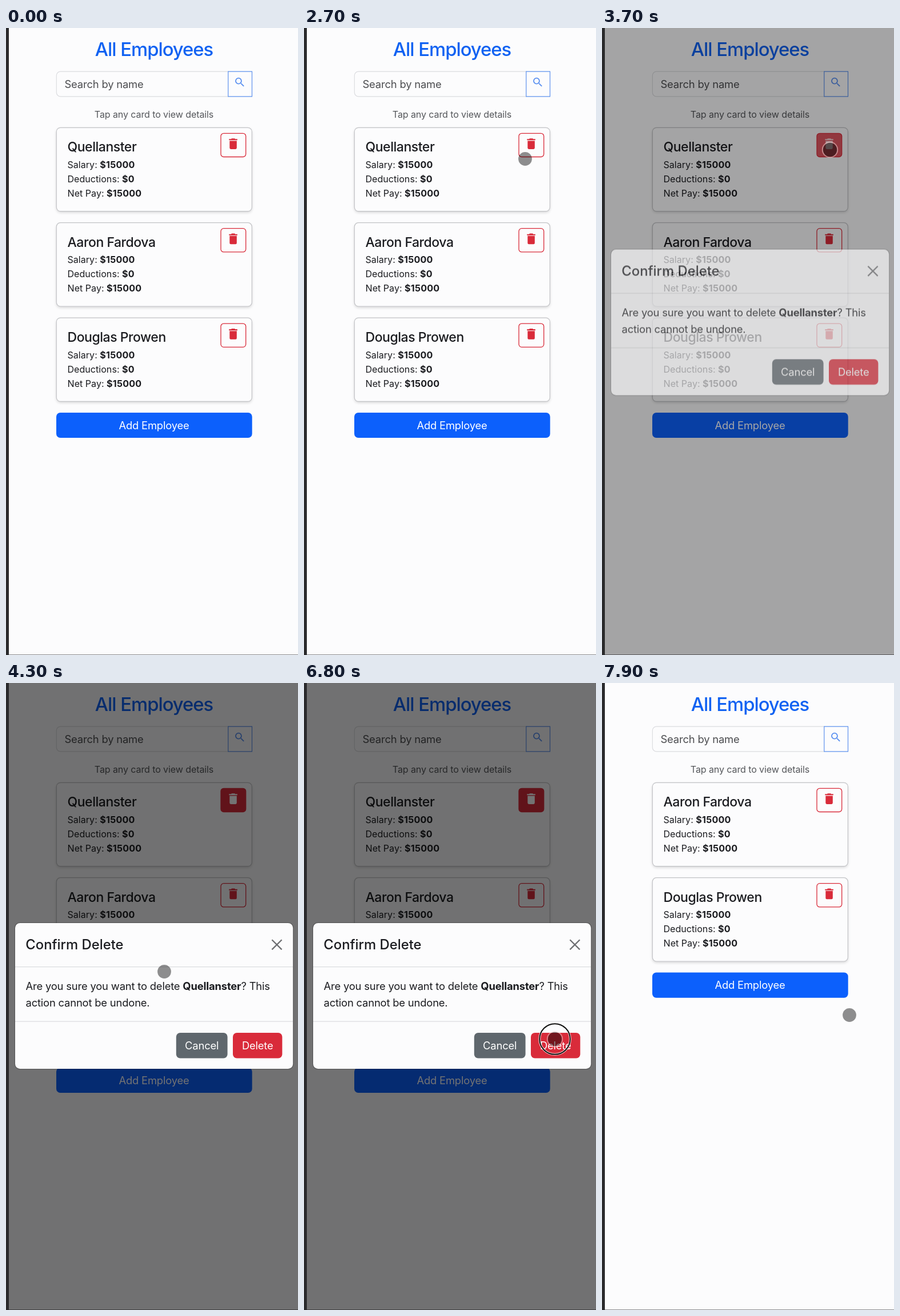
These frames come from a looping animation (511 px wide and 1097 px high, 8 s). An HTML page with a canvas:

```html
<!DOCTYPE html>
<html lang="en">
<head>
<meta charset="utf-8">
<title>All Employees</title>
<style>
  html, body { margin: 0; width: 100%; height: 100%; overflow: hidden; background: #fcfcfd; }
  canvas { display: block; width: 511px; height: 1097px; }
</style>
</head>
<body>
<canvas id="stage"></canvas>
<script>
const W = 511, H = 1097, LOOP = 8000, STEP = 100;
const dpr = window.devicePixelRatio || 1;

function surface(canvas) {
  canvas.width = W * dpr;
  canvas.height = H * dpr;
  const c = canvas.getContext('2d');
  c.scale(dpr, dpr);
  return c;
}

const stage = surface(document.getElementById('stage'));
const layer = surface(document.createElement('canvas'));
let ctx = stage;

const PAGE = '#fcfcfd', INK = '#1b1c20', BLUE = '#0c60fc', RED = '#d92b3a', RULE = '#dcdde0';
const people = ['Quellanster', 'Aaron Fardova', 'Douglas Prowen'];

const trashIcon = new Path2D('M6 19a2 2 0 0 0 2 2h8a2 2 0 0 0 2-2V7H6v12zM19 4h-3.5l-1-1h-5l-1 1H5v2h14V4z');
const searchIcon = new Path2D('M15.5 14h-.79l-.28-.27A6.47 6.47 0 0 0 16 9.5 6.5 6.5 0 1 0 9.5 16c1.61 0 3.09-.59 4.23-1.57l.27.28v.79l5 4.99L20.49 19l-4.99-5zm-6 0C7.01 14 5 11.99 5 9.5S7.01 5 9.5 5 14 7.01 14 9.5 11.99 14 9.5 14z');

// Text styles: size, weight, tracking in em
const styles = {
  title: [32.8, 500, -0.031],
  name: [23, 500, -0.02],
  heading: [23.8, 500, 0],
  body: [18.4, 400, -0.01],
  strong: [18.4, 700, -0.01],
  small: [16.1, 400, 0],
  smallBold: [16.1, 700, 0.012],
  hint: [16.1, 400, -0.008]
};

// Timing in ms
const OPEN = 3605, CLOSE = 6830, REMOVED = 7000;
const presses = [3700, 6700];

// Pointer stops: time, x, y
const route = [
  [1000, 460, 772], [1400, 453, 705], [1800, 448, 600], [2300, 428, 370],
  [2700, 387, 229], [2900, 394, 218], [3200, 399, 213], [3900, 399, 213],
  [4300, 277, 505], [4700, 262, 522], [5200, 350, 566], [5700, 429.5, 587],
  [6000, 436, 628], [6100, 436, 628], [6200, 439, 623], [7400, 439, 623],
  [7600, 462, 607], [7900, 433, 581]
];

const clamp = v => Math.max(0, Math.min(1, v));

// cubic-bezier(0, 0, .58, 1)
function easeOut(x) {
  let lo = 0, hi = 1;
  for (let i = 0; i < 20; i++) {
    const s = (lo + hi) / 2;
    if (3 * (1 - s) * s * s * 0.58 + s * s * s < x) lo = s; else hi = s;
  }
  return 3 * (1 - lo) * lo * lo + lo * lo * lo;
}

function text(str, x, y, style, color = INK, align = 'left') {
  const [size, weight, track] = styles[style];
  ctx.font = `${weight} ${size}px Inter, Roboto, sans-serif`;
  ctx.letterSpacing = `${track * size}px`;
  ctx.textAlign = align;
  ctx.fillStyle = color;
  ctx.fillText(str, x, y);
  return x + ctx.measureText(str).width;
}

function box(x, y, w, h, r, fill, stroke, line = 1.2) {
  ctx.beginPath();
  ctx.roundRect(x, y, w, h, r);
  if (fill) { ctx.fillStyle = fill; ctx.fill(); }
  if (stroke) { ctx.strokeStyle = stroke; ctx.lineWidth = line; ctx.stroke(); }
}

function shadow(color, blur, dy) {
  ctx.shadowColor = color;
  ctx.shadowBlur = blur * dpr;
  ctx.shadowOffsetY = dy * dpr;
}

function line(x1, y1, x2, y2, color, width) {
  ctx.strokeStyle = color;
  ctx.lineWidth = width;
  ctx.beginPath();
  ctx.moveTo(x1, y1);
  ctx.lineTo(x2, y2);
  ctx.stroke();
}

function icon(path, x, y, scale, color) {
  ctx.save();
  ctx.translate(x, y);
  ctx.scale(scale, scale);
  ctx.fillStyle = color;
  ctx.fill(path);
  ctx.restore();
}

function circle(x, y, r, fill, stroke, width) {
  ctx.beginPath();
  ctx.arc(x, y, r, 0, Math.PI * 2);
  if (fill) { ctx.fillStyle = fill; ctx.fill(); }
  if (stroke) { ctx.strokeStyle = stroke; ctx.lineWidth = width; ctx.stroke(); }
}

// active: 0 outlined, 1 filled
function trashButton(x, y, active) {
  box(x, y, 43.7, 41.2, 5, PAGE, RED, 1.3);
  icon(trashIcon, x + 9.1, y + 5.8, 1.04, RED);
  if (!active) return;
  ctx.save();
  ctx.globalAlpha = active;
  box(x, y, 43.7, 41.2, 5, RED);
  icon(trashIcon, x + 9.1, y + 5.8, 1.04, '#fff');
  ctx.restore();
}

function card(name, y, active) {
  ctx.save();
  shadow('rgba(0,0,0,.16)', 5, 2.2);
  box(88.3, y, 342, 146.3, 7, PAGE);
  ctx.restore();
  box(88.3, y, 342, 146.3, 7, null, '#c3c4c7');
  text(name, 107.5, y + 41.8, 'name');
  [['Salary: ', '$15000'], ['Deductions: ', '$0'], ['Net Pay: ', '$15000']].forEach(([label, sum], i) => {
    const ly = y + 70.7 + i * 24.9;
    text(sum, text(label, 107.5, ly, 'small'), ly, 'smallBold');
  });
  trashButton(376, y + 10, active);
}

function page(t) {
  ctx.fillStyle = PAGE;
  ctx.fillRect(0, 0, W, H);
  text('All Employees', 259, 49.3, 'title', '#1062f2', 'center');

  box(88.3, 76.2, 301, 43.6, [7, 0, 0, 7], PAGE, RULE);
  text('Search by name', 102.5, 105, 'body', '#4c4d50');
  box(388.8, 76.2, 41.7, 43.6, 0, PAGE, '#5f93ee');
  icon(searchIcon, 398.4, 84.1, 0.9, '#5a90f0');
  text('Tap any card to view details', 259, 157, 'hint', '#55575b', 'center');

  const removed = t >= REMOVED;
  const list = removed ? people.slice(1) : people;
  const pressed = removed ? 0 : clamp((t - OPEN) / 120);
  list.forEach((name, i) => card(name, 174.3 + i * 166.4, i ? 0 : pressed));
  const y = 173.7 + list.length * 166.4;
  box(88, y, 342.7, 44.2, 7, BLUE);
  text('Add Employee', 259, y + 28.9, 'body', '#fff', 'center');

  ctx.fillStyle = '#8a8a8d';
  ctx.fillRect(0, H - 1, W, 1);
}

function modal() {
  box(16, 420, 486.2, 255, 8.5, PAGE);
  box(15.4, 419.4, 487.4, 256.2, 9, null, 'rgba(0,0,0,.2)');
  text('Confirm Delete', 34.3, 466.3, 'heading');
  line(465.4, 449.2, 482.6, 466.4, '#6e6f72', 2.3);
  line(482.6, 449.2, 465.4, 466.4, '#6e6f72', 2.3);
  line(16, 496.6, 502, 496.6, RULE, 1.2);
  line(16, 592.2, 502, 592.2, RULE, 1.2);

  let x = text('Are you sure you want to delete ', 34.5, 537.3, 'body');
  x = text(people[0], x, 537.3, 'strong');
  text('? This', x, 537.3, 'body');
  text('action cannot be undone.', 34.5, 565.8, 'body');

  box(297.8, 612, 89.8, 44.6, 7, '#5f676d');
  text('Cancel', 342.7, 641, 'body', '#fff', 'center');
  box(397, 612, 86.4, 44.6, 7, RED);
  text('Delete', 440.2, 641, 'body', '#fff', 'center');
}

function dialog(t) {
  if (t < OPEN || t >= CLOSE + 150) return;
  const closing = t >= CLOSE;
  const age = t - (closing ? CLOSE : OPEN);
  const fade = clamp(age / 150), slide = easeOut(clamp(age / 300));
  const alpha = closing ? 1 - fade : fade;
  ctx.fillStyle = `rgba(0,0,0,${0.55 * alpha})`;
  ctx.fillRect(5, 0, W - 5, H);

  // Compose on a layer so the dialog fades as one piece
  ctx = layer;
  ctx.clearRect(0, 0, W, H);
  modal();
  ctx = stage;
  ctx.save();
  ctx.globalAlpha = alpha;
  ctx.drawImage(layer.canvas, 0, -61 * (closing ? slide : 1 - slide), W, H);
  ctx.restore();
}

function pointer(t) {
  if (t < route[0][0]) return;
  let i = 0;
  while (i < route.length - 2 && t >= route[i + 1][0]) i++;
  const [t0, x0, y0] = route[i], [t1, x1, y1] = route[i + 1];
  const k = clamp((t - t0) / (t1 - t0));
  const x = x0 + (x1 - x0) * k, y = y0 + (y1 - y0) * k;

  const press = presses.find(p => t >= p && t < p + 300);
  if (press === undefined) {
    circle(x, y, 11.9, 'rgba(0,0,0,.44)');
    return;
  }
  circle(x, y, 12.6, 'rgba(0,0,0,.47)');
  circle(x, y, 13.2, null, 'rgba(255,215,215,.5)', 2);
  const age = t - press;
  if (age > 0) {
    ctx.save();
    ctx.globalAlpha = clamp((300 - age) / 200);
    const r = 13.5 + 13.3 * clamp(age / 100);
    circle(x, y, r, null, 'rgba(255,255,255,.8)', 4);
    circle(x, y, r, null, '#111', 2);
    ctx.restore();
  }
}

function frame(now) {
  const t = Math.floor((now % LOOP) / STEP) * STEP;
  page(t);
  dialog(t);
  ctx.fillStyle = '#2a2a2c';
  ctx.fillRect(0, 0, 5, H);
  pointer(t);
}

let start;
function tick(now) {
  if (start === undefined) start = now;
  frame(now - start);
  requestAnimationFrame(tick);
}
frame(0);
requestAnimationFrame(tick);
</script>
</body>
</html>
```
